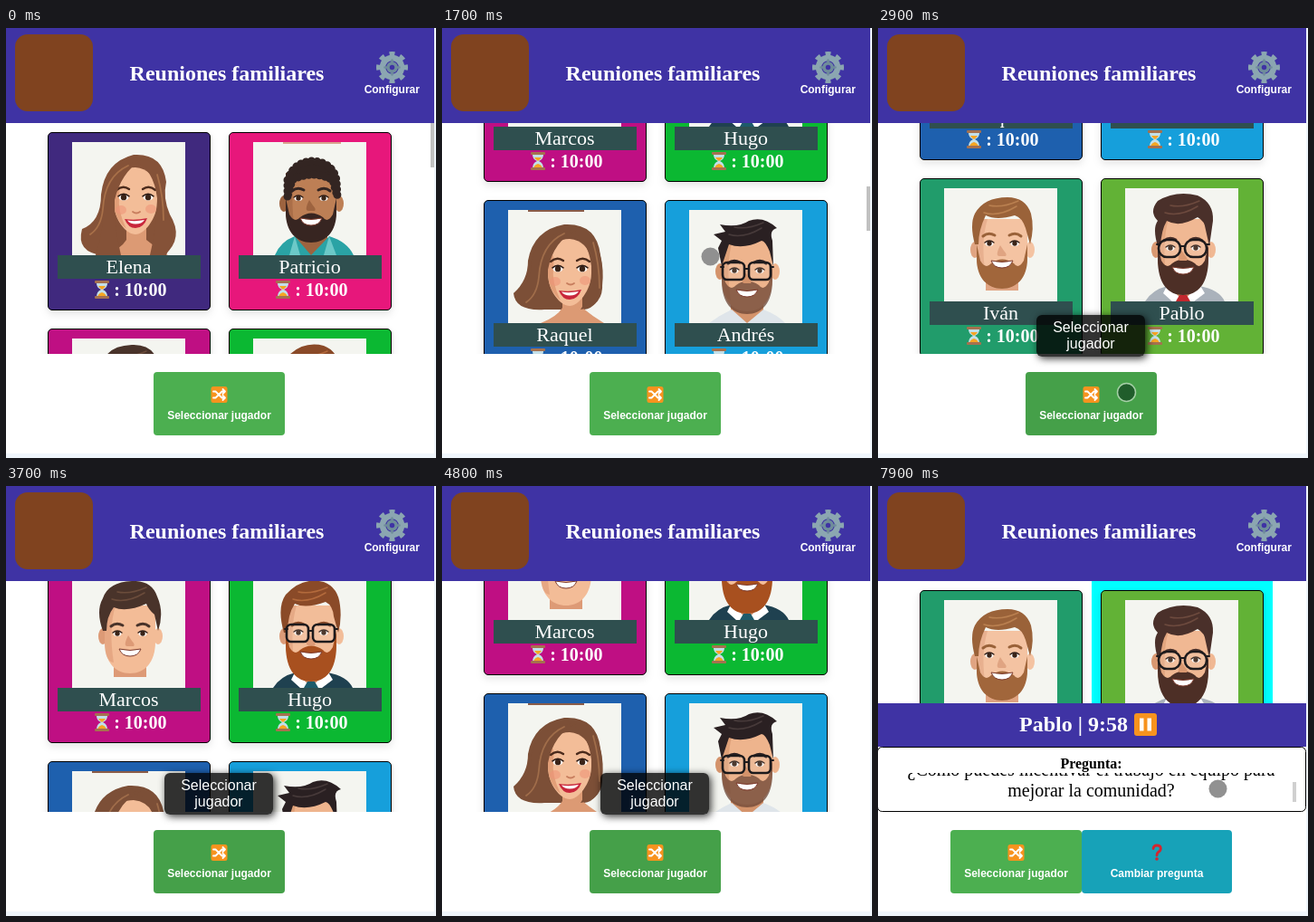
These frames come from a looping animation (475x475 px, 8000 ms). An HTML page:

```html
<!DOCTYPE html>
<html lang="es">
<head>
<meta charset="utf-8">
<title>Reuniones familiares</title>
<style>
html, body { margin: 0; width: 100%; height: 100%; overflow: hidden; background: #f0f6fc; }
svg { display: block; }
text { font-family: "Liberation Serif", "Times New Roman", serif; text-anchor: middle; }
.sans { font-family: "Liberation Sans", Arial, sans-serif; }
.b { font-weight: bold; }
.w { fill: #fff; }
.card { filter: drop-shadow(0 4px 4px rgba(0,0,0,.1)); }
#tip {
  position: absolute; left: 175px; top: 317px; width: 120px; height: 46px; box-sizing: border-box; padding-top: 5px;
  border-radius: 6px; background: rgba(0,0,0,.8); box-shadow: 2px 2px 8px rgba(0,0,0,.8);
  color: #fff; font-size: 16px; line-height: 18px; text-align: center;
}
</style>
</head>
<body>
<svg id="stage" width="475" height="475" viewBox="0 0 475 475"></svg>
<div id="tip" class="sans">Seleccionar<br>jugador</div>
<script>
const rect = (x, y, w, h, fill, more = '') => `<rect x="${x}" y="${y}" width="${w}" height="${h}" fill="${fill}" ${more}/>`;
const path = (d, fill, more = '') => `<path d="${d}" fill="${fill}" ${more}/>`;
const line = (d, color, w = 2) => path(d, 'none', `stroke="${color}" stroke-width="${w}" stroke-linecap="round" stroke-linejoin="round"`);
const oval = (x, y, rx, ry, fill, more = '') => `<ellipse cx="${x}" cy="${y}" rx="${rx}" ry="${ry}" fill="${fill}" ${more}/>`;
const text = (x, y, size, cls, str, more = '') => `<text x="${x}" y="${y}" font-size="${size}" class="${cls}" ${more}>${str}</text>`;
const move = (x, y, inner) => `<g transform="translate(${x} ${y})">${inner}</g>`;

// ---- portraits, in a 125 x 125 box ----
const eye = (x, y, k = 1) => oval(x, y, 4.5 * k, 3 * k, '#fff') + oval(x, y, 2.7 * k, 2.8 * k, '#3a2418')
  + line(`M${x - 5 * k} ${y - k}q${5 * k} ${-4 * k} ${10 * k} 0`, '#2b1a14', 1.3 * k);

function man(o) {
  const { skin, shade, hair, top, chin, ey, my, beard, glasses, shirt = '', end = 125 } = o;
  let s = rect(46, 85, 36, end - 85, shade) + shirt;
  s += oval(34, 68, 5, 9, shade) + oval(95, 68, 5, 9, skin);
  const jaw = (y, c) => `C92 ${c - 12} 80 ${c} 64 ${c}C48 ${c} 36 ${c - 12} 36 ${y}Z`;
  s += path('M36 34H92V74' + jaw(74, chin), skin);
  s += path(`M36 34H48Q40 60 46 ${chin - 12}Q36 96 36 74Z`, shade, 'opacity=".6"');
  if (beard) s += path('M36 62L40 80Q46 90 52 83Q64 74 77 83Q82 90 88 80L92 62V78' + jaw(78, chin + 3), beard, `opacity="${o.thin || 1}"`);
  s += path(`M52 ${my - 3}Q64 ${my} 76 ${my - 3}Q73 ${my + 5} 64 ${my + 5}Q55 ${my + 5} 52 ${my - 3}Z`, '#fff', 'stroke="#7c3a2c" stroke-width="1"');
  s += path(`M62 ${ey + 2}Q56 ${ey + 14} 61 ${ey + 14}H68Q70 ${ey + 12} 66 ${ey + 8}Z`, shade);
  s += eye(50, ey) + eye(78, ey);
  s += line(`M43 ${ey - 8}q6 -5 13 -1M72 ${ey - 9}q7 -4 13 1`, hair, 3);
  s += path(top, hair, o.curl ? `stroke="${hair}" stroke-width="9" stroke-linecap="round" stroke-dasharray="0 6"` : '');
  if (!o.curl) s += line('M44 27Q60 32 80 20M50 19Q64 22 82 14', o.glow, 1.5);
  if (glasses) {
    const lens = x => rect(x - 12, ey - 9, 24, 19, '#fff', `fill-opacity=".1" rx="${glasses}" stroke="#1d1a1c" stroke-width="2.6"`);
    s += lens(49) + lens(78) + line(`M61 ${ey - 2}h5M35 ${ey - 4}h3M90 ${ey - 4}h3`, '#1d1a1c');
  }
  return s;
}

function woman(back, front, dx, dy, hair, glow) {
  const face = path('M46 46Q52 28 70 28Q90 30 94 52V66C94 84 80 102 70 102C60 102 46 86 46 66Z', '#f3bd98')
    + path('M46 46Q54 40 52 60Q50 76 60 96Q46 84 46 66Z', '#e29f78')
    + oval(54, 75, 6, 5, '#ef9478', 'opacity=".6"') + oval(87, 74, 6, 5, '#ef9478', 'opacity=".6"')
    + eye(57, 61, 1.2) + eye(84, 61, 1.2)
    + line('M49 53q7 -6 14 -1M78 52q7 -5 14 1', '#4b2b1c', 2.4) + line('M67 77q4 3 8 0', '#c77d5d', 1.8)
    + path('M58 85Q70 87 83 84Q79 95 70 95Q62 95 58 85Z', '#c8273c') + path('M61 86.5Q70 88 80 86Q77 90.5 70 90.5Q64 90.5 61 86.5Z', '#fff');
  return path(back, hair) + path('M60 90H82V108Q94 118 106 125H36Q54 118 60 108Z', '#dc9a74')
    + move(dx, dy, face) + path(front, hair) + line('M62 26Q36 38 34 74Q32 94 20 102M94 36Q101 60 101 86', glow, 1.8);
}

const suit = (color, tie) => path('M22 125Q30 112 47 108L64 125L82 108Q104 112 110 125Z', color)
  + path('M47 106L64 125L82 106L88 116L76 125H52L42 116Z', '#fff') + path('M60 118H68L72 125H56Z', tie);

const people = [
  ['Elena', '#40297e', woman('M68 14Q100 12 104 44Q100 62 108 80Q124 106 102 125H34Q4 122 11 96Q32 88 32 58Q36 22 68 14Z',
    'M76 20Q54 34 47 64Q46 92 54 125H26Q36 96 34 64Q40 26 76 20ZM70 22Q90 30 94 62Q94 92 86 125H104Q116 100 102 70Q104 20 70 16Z', 0, 0, '#855238', '#a87049')],
  ['Patricio', '#e7177b', rect(33, 0, 64, 2, '#d8a48d') + man({
    skin: '#bd7f55', shade: '#9d633f', hair: '#332522', curl: 1, chin: 108, ey: 62, my: 87, beard: '#372521',
    top: 'M38 60L38 42Q45 22 65 21Q88 22 92 42L93 60L88 42Q66 30 43 42Z',
    shirt: path('M24 125Q30 110 46 104L64 125L84 104Q104 110 111 125Z', '#2aa3a5') + path('M46 104L52 125H40ZM84 104L78 125H92Z', '#6cc9c8') })],
  ['Marcos', '#bf0f83', man({
    skin: '#f3bc97', shade: '#dd9a76', hair: '#49332a', glow: '#6b4c3b', chin: 109, ey: 65, my: 85, end: 113,
    top: 'M34 62Q26 40 34 26Q40 8 66 7Q88 6 94 24Q102 42 95 62L91 44Q84 38 82 32Q60 42 46 36Q38 46 38 62Z' })],
  ['Hugo', '#0bb832', man({
    skin: '#f2bd99', shade: '#dc9b78', hair: '#8a4a28', glow: '#b36a3c', chin: 115, ey: 64, my: 88, beard: '#a8501f', glasses: 5,
    top: 'M34 64Q26 36 36 22Q54 2 78 8Q94 14 96 34Q98 50 94 64L89 46Q88 34 80 30Q58 38 46 32Q38 44 38 64Z', shirt: suit('#1f4150', '#1d5b6b') })],
  ['Raquel', '#1e60ae', rect(22, 0, 62, 2, '#8a5c48') + woman('M62 16Q98 14 102 50Q106 66 104 84Q100 108 84 110H40Q8 112 6 92Q22 78 22 56Q28 22 62 16Z',
    'M76 22Q50 34 44 66Q42 92 60 108H30Q8 108 7 92Q26 84 26 56Q34 24 76 22ZM68 24Q88 30 92 62Q94 90 80 110Q106 106 104 80Q106 18 66 18Z', -2, 4, '#7c4f37', '#a06d4a')],
  ['Andrés', '#169fdb', man({
    skin: '#eeb48d', shade: '#d4936b', hair: '#2a2022', glow: '#473a3a', chin: 112, ey: 67, my: 91, beard: '#6b4535', thin: .75, glasses: 5,
    top: 'M36 62L32 42L36 34L27 27L40 24L34 16Q54 20 66 12Q82 6 97 20Q88 22 92 34L93 62L89 46Q84 34 80 34Q60 44 44 38Z',
    shirt: path('M22 125Q34 116 47 110L64 125L82 110Q98 116 106 125Z', '#dfe5ea') })],
  ['Iván', '#219c6b', man({
    skin: '#f4c3a2', shade: '#e0a482', hair: '#9a6239', glow: '#ba8050', chin: 108, ey: 61, my: 83, beard: '#a1663b', end: 113,
    top: 'M34 62Q28 40 34 28Q44 10 70 10Q90 10 96 28Q100 44 95 62L90 44Q86 32 78 30Q58 36 46 30Q38 46 38 62Z' })],
  ['Pablo', '#62b236', man({
    skin: '#f0b893', shade: '#d99871', hair: '#4a302a', glow: '#6d4a3e', chin: 115, ey: 66, my: 90, beard: '#4d2f26', glasses: 9,
    top: 'M36 64Q30 44 36 36Q26 26 36 14Q56 2 80 8Q98 16 97 36L93 64L89 46Q88 36 80 32Q60 44 46 36Q40 46 39 64Z', shirt: suit('#aab2bb', '#c2282e') })]
];

// ---- icons ----
const hourglass = path('M3 3H15Q15 8 10 10Q15 12 15 18H3Q3 12 8 10Q3 8 3 3Z', '#c3dfe8') + path('M5 6H13Q12 8 9 10Q6 8 5 6ZM4 18Q5 14 9 13Q13 14 14 18Z', '#f5a623')
  + rect(1, 0, 16, 3, '#a5714f', 'rx="1"') + rect(1, 17, 16, 3, '#a5714f', 'rx="1"');
const shuffle = rect(0, 0, 18, 18, '#f7931e', 'rx="2.5"')
  + line('M2.5 5.5H5L12 12.5H15M2.5 12.5H5L12 5.5H15M13 3L15.5 5.5L13 8M13 10L15.5 12.5L13 15', '#fff', 1.8);
const pause = rect(0, 0, 25, 25, '#f7931e', 'rx="3"') + rect(6, 5.5, 4.5, 14, '#fff') + rect(14.5, 5.5, 4.5, 14, '#fff');
const question = line('M-4 -4.5Q-3.5 -8 0 -8Q4.3 -8 4.3 -4.5Q4.3 -2 1.5 -.5Q0 .5 0 3', '#d3262f', 2.8) + oval(0, 7, 1.8, 1.8, '#d3262f');
const ring = (r, w, color, more = '') => `<circle r="${r}" fill="none" stroke="${color}" stroke-width="${w}" ${more}/>`;
const gear = ring(14.5, 6, '#8ba6b1', 'pathLength="16" stroke-dasharray="1 1" stroke-dashoffset=".5"') + ring(10.5, 6.5, '#8ba6b1')
  + ring(4.5, 3.5, '#6f8d9b') + line('M0 -8V-5M0 8V5M-8 0H-5M8 0H5', '#6f8d9b', 2.6);

const card = ([name, color, face], i) => move(46 + i % 2 * 200, 115 + (i >> 1) * 217,
  rect(-10, -10, 200, 217, '#0ff', 'class="halo" visibility="hidden"')
  + rect(.5, .5, 179, 196, color, 'rx="4.5" stroke="#000" class="card"')
  + move(27, 11, '<svg width="125" height="125">' + rect(0, 0, 125, 125, '#f4f5f0') + face + '</svg>')
  + rect(11, 136, 158, 26, '#2f4f4f')
  + text(89.5, 156, 22, 'w', name) + move(51, 164, hourglass) + text(102.3, 181, 20, 'b w', ': 10:00'));

const PURPLE = '#3f33a4';
const $ = id => document.getElementById(id);
$('stage').innerHTML = `<clipPath id="view"><rect id="port" y="105" width="475" height="255"/></clipPath>
  <clipPath id="lines"><rect y="317" width="475" height="32"/></clipPath>`
  + rect(0, 0, 473, 470, '#fff')
  + `<g clip-path="url(#view)"><g id="list">${people.map(card).join('')}</g></g>`
  + rect(469, 105, 4, 49, '#c1c1c1', 'id="thumb"')
  + rect(0, 0, 473, 105, PURPLE) + rect(10, 7, 86, 85, '#80431f', 'rx="14"')
  + text(244, 58, 24, 'b w', 'Reuniones familiares')
  + move(426.5, 43.5, gear) + text(426.3, 72, 12, 'sans b w', 'Configurar')
  + '<g id="game">' + rect(0, 240, 473, 48, PURPLE)
  + text(282, 271, 24, 'b w', '', 'id="clock" style="text-anchor:end"') + `<g id="pause">${pause}</g>`
  + rect(-.5, 288.5, 473, 71, '#fff', 'rx="5" stroke="#000"') + text(235.5, 312, 16, 'b', 'Pregunta:')
  + '<g clip-path="url(#lines)"><g id="ask">' + text(235.5, 334, 20, '', '¿Cómo puedes incentivar el trabajo en equipo para')
  + text(235.5, 357, 20, '', 'mejorar la comunidad?') + '</g></g>' + rect(458, 317, 4, 22, '#c1c1c1', 'id="bar"')
  + rect(225, 380, 166, 70, '#17a2b8', 'rx="4"') + move(308, 405, question)
  + text(308, 432, 12, 'sans b w', 'Cambiar pregunta') + '</g>'
  + '<g id="pick">' + rect(163, 380, 145, 70, '#4caf50', 'rx="4" id="button"') + move(226.5, 396, shuffle)
  + text(235.5, 432, 12, 'sans b w', 'Seleccionar jugador') + '</g>'
  + '<circle id="cursor" r="10"/>';

// ---- motion: [time, values...] ----
const scrollKeys = [[1000, 0], [1200, 150], [1400, 150], [1700, 359], [2100, 570], [2300, 600], [2900, 600], [3300, 490],
  [3700, 245], [4000, 40], [4100, 0], [4300, 30], [4500, 110], [4800, 320], [5100, 560], [5300, 640], [5400, 651]];
const cursorKeys = [[200, 438, 333], [800, 296.5, 252.5], [1900, 296.5, 252.5], [2300, 290, 353], [2600, 274.5, 402.5],
  [5800, 274.5, 402.5], [5900, 395.5, 335.5], [6000, 395.5, 335.5], [6300, 365, 323], [6400, 365, 323], [6800, 375.5, 334.5]];

function at(keys, t) {
  const i = keys.findIndex(k => k[0] > t);
  if (i <= 0) return keys[i ? keys.length - 1 : 0].slice(1);
  const a = keys[i - 1], b = keys[i], u = (t - a[0]) / (b[0] - a[0]);
  return a.slice(1).map((v, j) => v + (b[j + 1] - v) * u);
}
const ramp = (t, a, b) => Math.min(1, Math.max(0, (t - a) / (b - a)));
const set = (id, attrs) => { for (const k in attrs) $(id).setAttribute(k, attrs[k]); };
const show = on => on ? 'visible' : 'hidden';
const halos = document.querySelectorAll('.halo');

function draw(now) {
  const t = Math.floor(now % 8000 / 100) * 100;
  const [scroll] = at(scrollKeys, t), [cx, cy] = at(cursorKeys, t);
  const playing = t >= 5100;

  set('list', { transform: `translate(0 ${-Math.round(scroll)})` });
  set('port', { height: playing ? 135 : 255 });
  set('thumb', { y: 105 + scroll * .195, visibility: show(t < 2500) });
  const lit = playing ? 7 : t >= 3800 && t < 4000 ? 0 : t >= 4000 && t < 4700 ? 1 : -1;
  halos.forEach((h, i) => h.setAttribute('visibility', show(i === lit)));

  const late = t >= 6100;
  const right = late ? 276 : 282;
  set('game', { visibility: show(playing) });
  $('clock').textContent = `${people[7][0]} | ${t >= 7100 ? '9:58' : late ? '9:59' : '10:00'}`;
  set('clock', { x: right });
  set('pause', { transform: `translate(${right + 7} 251)` });
  const u = ramp(t, 7300, 7500);
  set('ask', { transform: `translate(0 ${-14 * u})` });
  set('bar', { y: 317 + 10 * u, fill: t >= 7900 ? '#d0d0d0' : '#c1c1c1' });

  const shift = playing ? -83 : 0;
  set('pick', { transform: `translate(${shift} 0)` });
  set('button', { fill: t >= 2500 && t < 6200 ? '#45a049' : '#4caf50' });
  $('tip').style.transform = `translateX(${shift}px)`;
  $('tip').style.opacity = ramp(t, 2400, 2700) * (1 - ramp(t, 6000, 6300));

  const press = t >= 2800 && t < 3100;
  set('cursor', {
    cx, cy, visibility: show(t >= 200 && t < 3300 || t >= 5900),
    fill: press ? '#1f5a2a' : '#858585', 'fill-opacity': press ? .95 : .9,
    stroke: press ? '#a5d0a7' : 'none', 'stroke-width': 1.5
  });
}

const start = performance.now();
function loop() {
  draw(performance.now() - start);
  requestAnimationFrame(loop);
}
loop();
</script>
</body>
</html>
```
